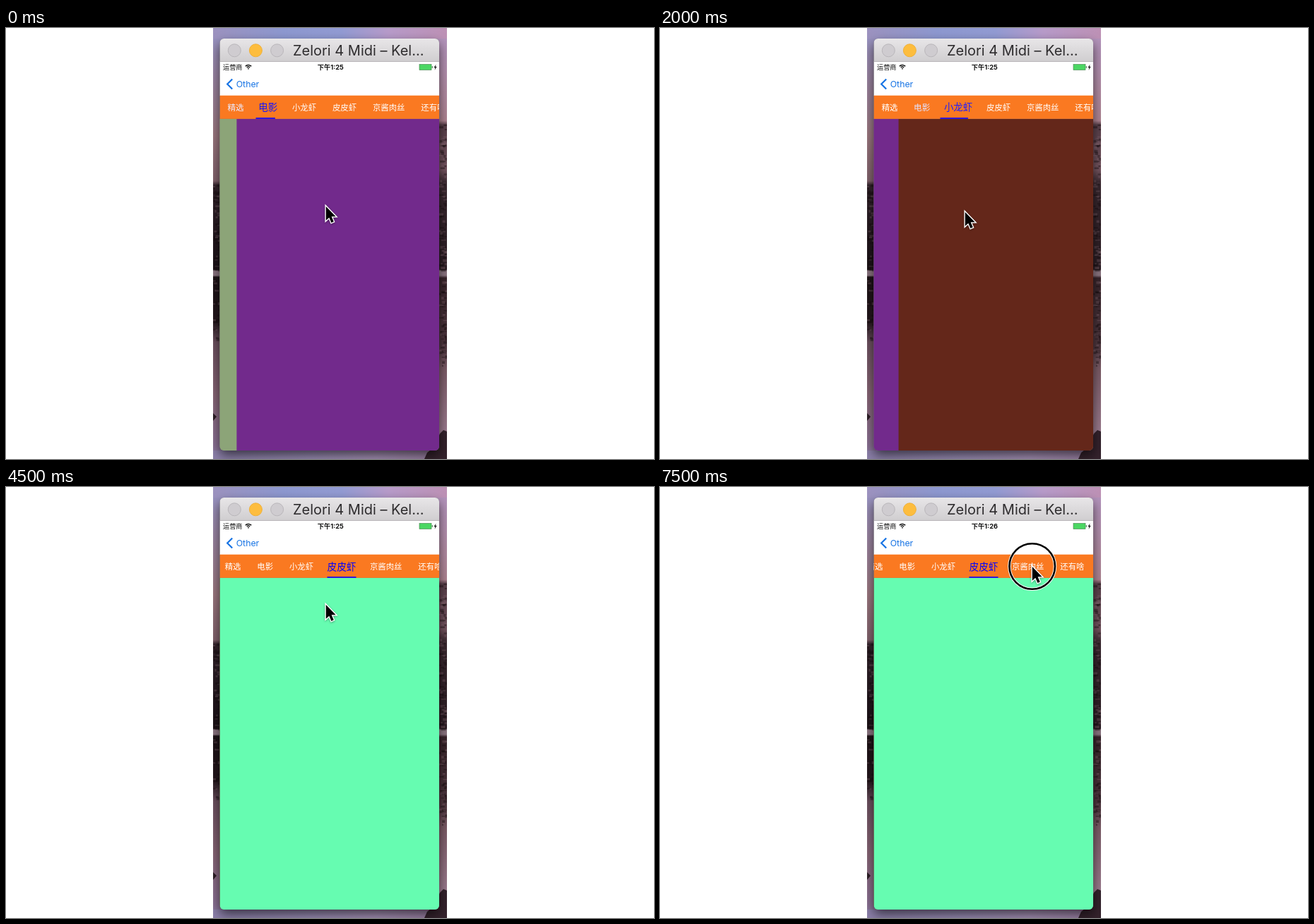
An HTML page with a canvas that plays this animation: 917 by 611 pixels, repeating every 8 s.

```html
<!DOCTYPE html>
<html lang="zh-CN">
<head>
<meta charset="utf-8">
<title>Paged tabs</title>
<style>
html, body { margin: 0; width: 917px; height: 611px; overflow: hidden; background: #fff; }
canvas { display: block; }
</style>
</head>
<body>
<canvas id="stage" width="917" height="611" lang="zh-CN"></canvas>
<script>
const ctx = document.getElementById('stage').getContext('2d');
const LOOP = 8000, STEP = 500;
const WIN = { x: 302.5, y: 15, w: 310.5, h: 584 };
const BAR = { top: 95.7, bottom: 128.8 };
const CJK = '"Noto Sans CJK SC", "Noto Sans CJK", sans-serif';
const LATIN = 'Inter, "Open Sans", sans-serif';
const PAGES = ['#8ca478', '#722a8c', '#64271a', '#66fcb1'];
const TITLES = ['精选', '电影', '小龙虾', '皮皮虾', '京酱肉丝', '还有啥'];
const SIZE = 11.4, GAP = 22.8, ZOOM = 0.2;

// time, page, tab bar offset, pointer x, pointer y
const KEYS = [
  [0, 0.923, 0, 452, 250],
  [500, 1, 0, 424, 254],
  [1000, 1.183, 0, 366, 252],
  [2000, 1.887, 0, 431, 258],
  [2500, 2, 0, 404, 258],
  [3000, 2.103, 0, 372, 258],
  [3500, 2.685, 0, 401.5, 234],
  [4000, 3, 0, 430, 200],
  [5500, 3, 12, 496, 92],
  [6000, 3, 21, 505, 98],
  [7500, 3, 21, 526, 110]
];
const PRESSES = [1000, 7500];

let edge = WIN.x + 11.2;
const TABS = TITLES.map(text => {
  const w = text.length * SIZE;
  const tab = { text, w, mid: edge + w / 2 };
  edge += w + GAP;
  return tab;
});

const mix = (a, b, k) => a + (b - a) * k;

function stateAt(t) {
  let i = KEYS.findIndex(k => k[0] > t);
  if (i < 0) i = KEYS.length;
  const a = KEYS[i - 1], b = KEYS[i] || a;
  const k = a === b ? 0 : (t - a[0]) / (b[0] - a[0]);
  const [, page, offset, x, y] = a.map((v, n) => mix(v, b[n], k));
  return { page, offset, x, y };
}

function randomFrom(seed) {
  return () => (seed = seed * 16807 % 2147483647) / 2147483647;
}

function rect(x, y, w, h, fill) {
  ctx.fillStyle = fill;
  ctx.fillRect(x, y, w, h);
}

function poly(points, fill) {
  ctx.beginPath();
  points.forEach(p => ctx.lineTo(p[0], p[1]));
  ctx.closePath();
  if (fill) {
    ctx.fillStyle = fill;
    ctx.fill();
  }
}

function dot(x, y, r, fill, line) {
  ctx.beginPath();
  ctx.arc(x, y, r, 0, Math.PI * 2);
  ctx.fillStyle = fill;
  ctx.fill();
  ctx.strokeStyle = line;
  ctx.lineWidth = 1;
  ctx.stroke();
}

function label(text, x, y, font, fill, align = 'left') {
  ctx.font = font;
  ctx.fillStyle = fill;
  ctx.textAlign = align;
  ctx.fillText(text, x, y);
}

function gradient(x0, y0, x1, y1, stops) {
  const g = ctx.createLinearGradient(x0, y0, x1, y1);
  stops.forEach(([at, color]) => g.addColorStop(at, color));
  return g;
}

function windowPath() {
  ctx.beginPath();
  ctx.roundRect(WIN.x, WIN.y, WIN.w, WIN.h, 6);
}

// short streaks that stand for trees and their reflection
function streaks(x, top, bottom, count, seed) {
  const rnd = randomFrom(seed);
  for (let i = 0; i < count; i++) {
    const light = rnd() < 0.35;
    rect(x + rnd() * 10 - 2, mix(top, bottom, rnd()), 2 + rnd() * 5, 1 + rnd() * 3,
      light ? 'rgba(150,115,125,.3)' : 'rgba(20,10,14,.4)');
  }
}

function drawBackdrop() {
  rect(293, 0, 166, 611, gradient(0, 0, 0, 611, [
    [0, '#9695c6'], [0.1, '#9a86a6'], [0.25, '#9c7880'], [0.355, '#82636d'],
    [0.365, '#33242c'], [0.55, '#1b1217'], [0.56, '#20161b'], [0.564, '#8c7682'],
    [0.574, '#8c7682'], [0.578, '#1c1216'], [0.68, '#24171c'], [0.73, '#6d5160'],
    [0.85, '#876575'], [0.97, '#8b7194'], [1, '#8b7fa9']]));
  rect(459, 0, 165, 611, gradient(0, 0, 0, 611, [
    [0, '#b294bf'], [0.1, '#b38fae'], [0.215, '#b08593'], [0.225, '#59404a'],
    [0.33, '#74545f'], [0.36, '#39282f'], [0.56, '#2b1d23'], [0.564, '#8c7682'],
    [0.574, '#8c7682'], [0.58, '#38252b'], [0.74, '#503840'], [0.79, '#7c5c67'],
    [0.93, '#9b7a8d'], [1, '#a58bb0']]));
  streaks(293, 220, 342, 45, 11);
  streaks(293, 354, 450, 25, 23);
  streaks(614, 136, 342, 90, 37);
  streaks(614, 354, 480, 50, 53);
  rect(293, 0, 331, 15, gradient(293, 0, 624, 0, [
    [0, '#9c92bf'], [0.3, '#8d98d0'], [0.55, '#929bd3'], [0.75, '#b79bca'], [1, '#bd91b5']]));
  rect(293, 599, 331, 12, gradient(293, 0, 624, 0, [
    [0, '#8b7fa9'], [0.4, '#9a8db5'], [0.7, '#a691b6'], [0.9, '#9d83a7'], [1, '#8b6d8a']]));
  poly([[592, 611], [596, 602], [606, 594], [614, 575], [619, 570], [624, 572], [624, 611]], '#34222c');
  poly([[293, 546], [298, 551], [293, 557]], '#2c1d25');
}

function drawChrome() {
  rect(WIN.x, 15, WIN.w, 33, gradient(0, 15, 0, 47, [[0, '#e8e6e8'], [1, '#d0ced0']]));
  rect(WIN.x, 47, WIN.w, 1, '#b8b5b8');
  dot(323.3, 31.8, 9, '#cfccd0', '#b9b6ba');
  dot(353.4, 31.8, 9, '#fdbd3e', '#efb038');
  dot(383.6, 31.8, 9, '#cfccd0', '#b9b6ba');
  label('Zelori 4 Midi – Kel…', 406, 39, '20px ' + LATIN, '#2e2c2e');
}

function drawHeader(t) {
  rect(WIN.x, 48, WIN.w, 48, '#fff');
  label('运营商', 307, 59.2, '9.2px ' + CJK, '#111');
  ctx.strokeStyle = '#111';
  ctx.lineWidth = 1.5;
  [2.9, 5.5].forEach(r => {
    ctx.beginPath();
    ctx.arc(343, 58, r, -Math.PI * 0.77, -Math.PI * 0.23);
    ctx.stroke();
  });
  poly([[341.8, 57], [344.2, 57], [343, 59]], '#111');

  const minute = t < 7000 ? 25 : 26;
  label('下午1:' + minute, 459.3, 59.2, 'bold 9.2px ' + LATIN.replace('sans-serif', CJK), '#111', 'center');

  rect(585, 51.5, 17, 8, '#4bd763');
  ctx.strokeStyle = '#4f8a58';
  ctx.lineWidth = 0.7;
  ctx.strokeRect(585, 51.5, 17, 8);
  rect(602.7, 54, 1.2, 3, '#4f8a58');
  poly([[608.6, 51.5], [605.4, 56.2], [607.3, 56.2], [606.6, 59.7], [609.8, 54.8], [607.8, 54.8]], '#222');

  ctx.beginPath();
  ctx.moveTo(320.2, 72.4);
  ctx.lineTo(313.2, 79.5);
  ctx.lineTo(320.2, 86.6);
  ctx.strokeStyle = '#1673e4';
  ctx.lineWidth = 2.2;
  ctx.stroke();
  label('Other', 325.7, 84, '12.3px ' + LATIN, '#1673e4');
}

function drawTabs(page, offset) {
  rect(WIN.x, BAR.top, WIN.w, BAR.bottom - BAR.top, '#fa7921');
  ctx.save();
  ctx.translate(-offset, 0);
  TABS.forEach((tab, i) => {
    const on = Math.max(0, 1 - Math.abs(page - i));
    const c = Math.round(255 * (1 - on));
    ctx.save();
    ctx.translate(tab.mid, 112.5);
    ctx.scale(1 + ZOOM * on, 1 + ZOOM * on);
    label(tab.text, 0, 4.2, '300 ' + SIZE + 'px ' + CJK, `rgb(${c},${c},255)`, 'center');
    ctx.restore();
  });
  const i = Math.floor(page), k = page - i;
  const a = TABS[i], b = TABS[i + 1];
  const w = mix(a.w, b.w, k) * (1 + ZOOM);
  rect(mix(a.mid, b.mid, k) - w / 2, BAR.bottom - 1.7, w, 1.7, '#1207f5');
  ctx.restore();
}

function drawPages(page) {
  PAGES.forEach((color, i) => {
    const x = WIN.x + (i - page) * WIN.w;
    rect(x, BAR.bottom, WIN.w + 1, 599 - BAR.bottom, color);
  });
}

function drawPointer(x, y, pressed) {
  if (pressed) {
    ctx.beginPath();
    ctx.arc(x + 0.7, y + 2.5, 32.3, 0, Math.PI * 2);
    ctx.strokeStyle = '#fff';
    ctx.lineWidth = 4.4;
    ctx.stroke();
    ctx.strokeStyle = '#000';
    ctx.lineWidth = 2.6;
    ctx.stroke();
  }
  ctx.save();
  ctx.translate(x + 0.8, y + 3);
  ctx.scale(0.92, 0.92);
  poly([[0, 0], [0, 21.5], [4.9, 17], [8.3, 25], [11.9, 23.4], [8.5, 15.6], [15, 15.4]]);
  ctx.shadowColor = 'rgba(0,0,0,.35)';
  ctx.shadowBlur = 3;
  ctx.shadowOffsetY = 1;
  ctx.strokeStyle = '#fff';
  ctx.lineWidth = 3;
  ctx.stroke();
  ctx.shadowColor = 'transparent';
  ctx.fillStyle = '#000';
  ctx.fill();
  ctx.restore();
}

function draw(t) {
  const s = stateAt(t);
  rect(0, 0, 917, 611, '#fff');

  ctx.save();
  ctx.beginPath();
  ctx.rect(293, 0, 331, 611);
  ctx.clip();
  drawBackdrop();
  ctx.shadowColor = 'rgba(0,0,0,.6)';
  ctx.shadowBlur = 16;
  ctx.shadowOffsetY = 7;
  windowPath();
  ctx.fillStyle = '#777';
  ctx.fill();
  ctx.restore();

  ctx.save();
  windowPath();
  ctx.clip();
  drawChrome();
  drawHeader(t);
  drawPages(s.page);
  drawTabs(s.page, s.offset);
  ctx.restore();

  drawPointer(s.x, s.y, PRESSES.includes(t));
}

const start = performance.now();
function tick(now) {
  const t = Math.max(0, now - start) % LOOP;
  draw(Math.floor(t / STEP) * STEP);
  requestAnimationFrame(tick);
}
draw(0);
requestAnimationFrame(tick);
</script>
</body>
</html>
```
